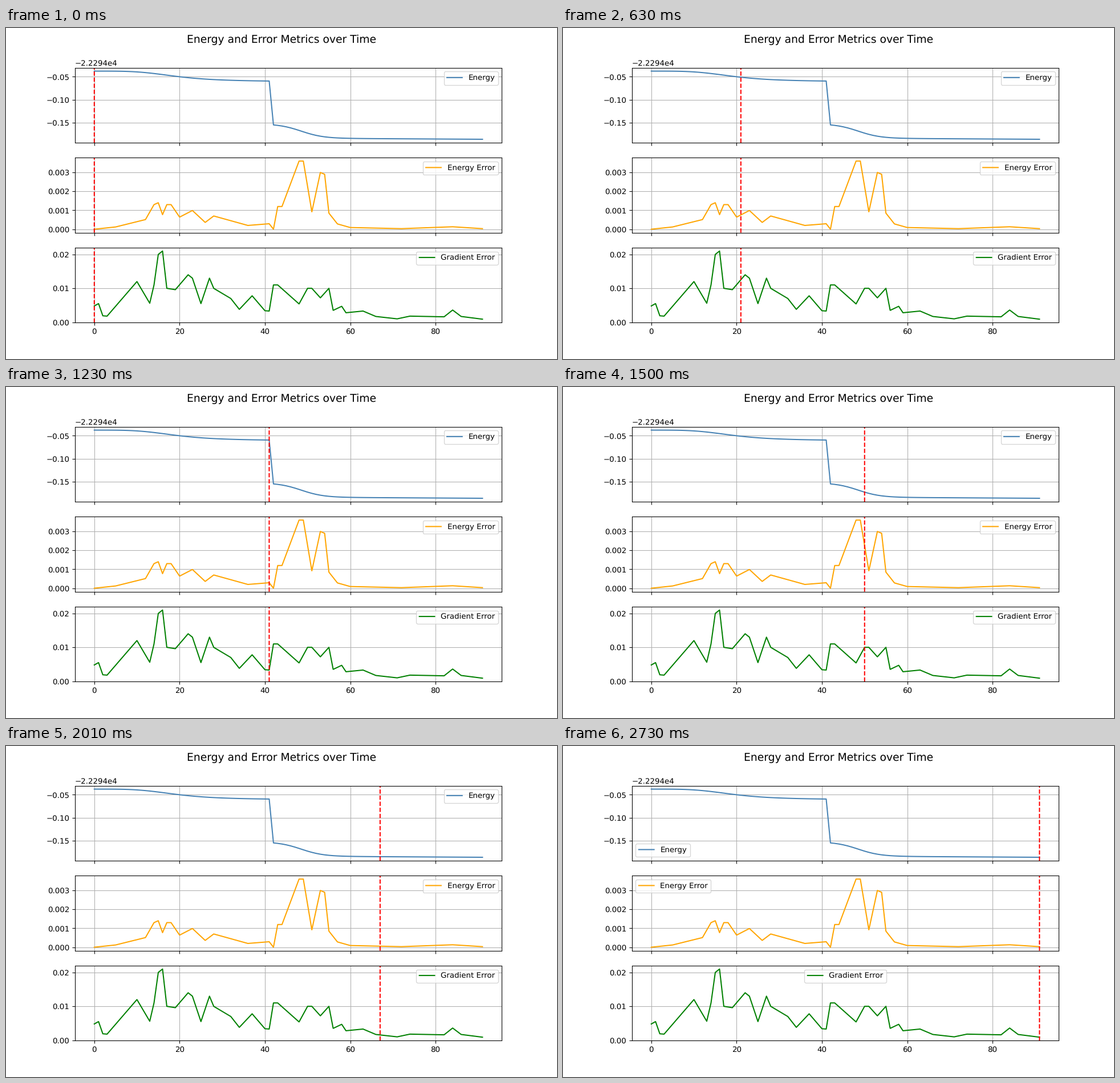
A matplotlib script for the animation above (2760 ms loop, 966 by 580 pixels).

```python
import matplotlib.pyplot as plt
import numpy as np
from matplotlib.animation import FuncAnimation

STEPS = 92
x = np.arange(STEPS)

plt.rcParams["text.hinting"] = "none"


def through(*points):
    """Straight segments through (step, value) turning points."""
    return np.interp(x, *np.transpose(points))


# Energy settles slowly, drops at step 42, then settles again.
rise = x ** 3.83
first = 377 + 227 * rise / (rise + 19.24 ** 3.83)
second = 1522 + 310 / (1 + np.exp((48.5 - x) / 2.6)) + 0.53 * (x - 42)
energy = -22294 - 1e-4 * np.where(x < 42, first, second)

energy_error = 1e-5 * through(
    (0, 0), (5, 12), (12, 51), (14, 130), (15, 140), (16, 77), (17, 130),
    (18, 130), (20, 64), (23, 99), (26, 36), (28, 70), (36, 20), (41, 29),
    (42, 0), (43, 120), (44, 120), (48, 360), (49, 360), (51, 92), (53, 300),
    (54, 290), (55, 85), (57, 28), (60, 9), (72, 3), (84, 13), (91, 3))

gradient_error = 1e-4 * through(
    (0, 48), (1, 55), (2, 19), (3, 18), (10, 120), (13, 56), (14, 110),
    (15, 200), (16, 210), (17, 100), (19, 96), (22, 140), (23, 130), (25, 55),
    (27, 130), (28, 100), (32, 70), (34, 38), (37, 78), (40, 34), (41, 33),
    (42, 110), (43, 110), (48, 54), (50, 100), (51, 100), (53, 72), (55, 100),
    (56, 35), (58, 47), (59, 28), (63, 33), (66, 17), (71, 10), (74, 18),
    (82, 16), (84, 36), (86, 17), (91, 9))

fig, axes = plt.subplots(3, 1, sharex=True, figsize=(10, 6.00415), dpi=96.6)
fig.suptitle("Energy and Error Metrics over Time", fontsize=14)

series = [
    (energy, "Energy", "steelblue"),
    (energy_error, "Energy Error", "orange"),
    (gradient_error, "Gradient Error", "green"),
]
cursors = []
for ax, (values, label, color) in zip(axes, series):
    ax.plot(x, values, label=label, color=color)
    cursors.append(ax.axvline(0, color="red", linestyle="--", snap=False))
    ax.grid(True)
    # "best" makes each legend dodge the cursor as it passes
    legend = ax.legend(loc="best")
    for handle in legend.get_lines():
        handle.set_snap(False)


def update(step):
    for cursor in cursors:
        cursor.set_xdata([step, step])
    return cursors


anim = FuncAnimation(fig, update, frames=STEPS, interval=30, repeat=True,
                     repeat_delay=0, blit=False)
plt.show()
```
